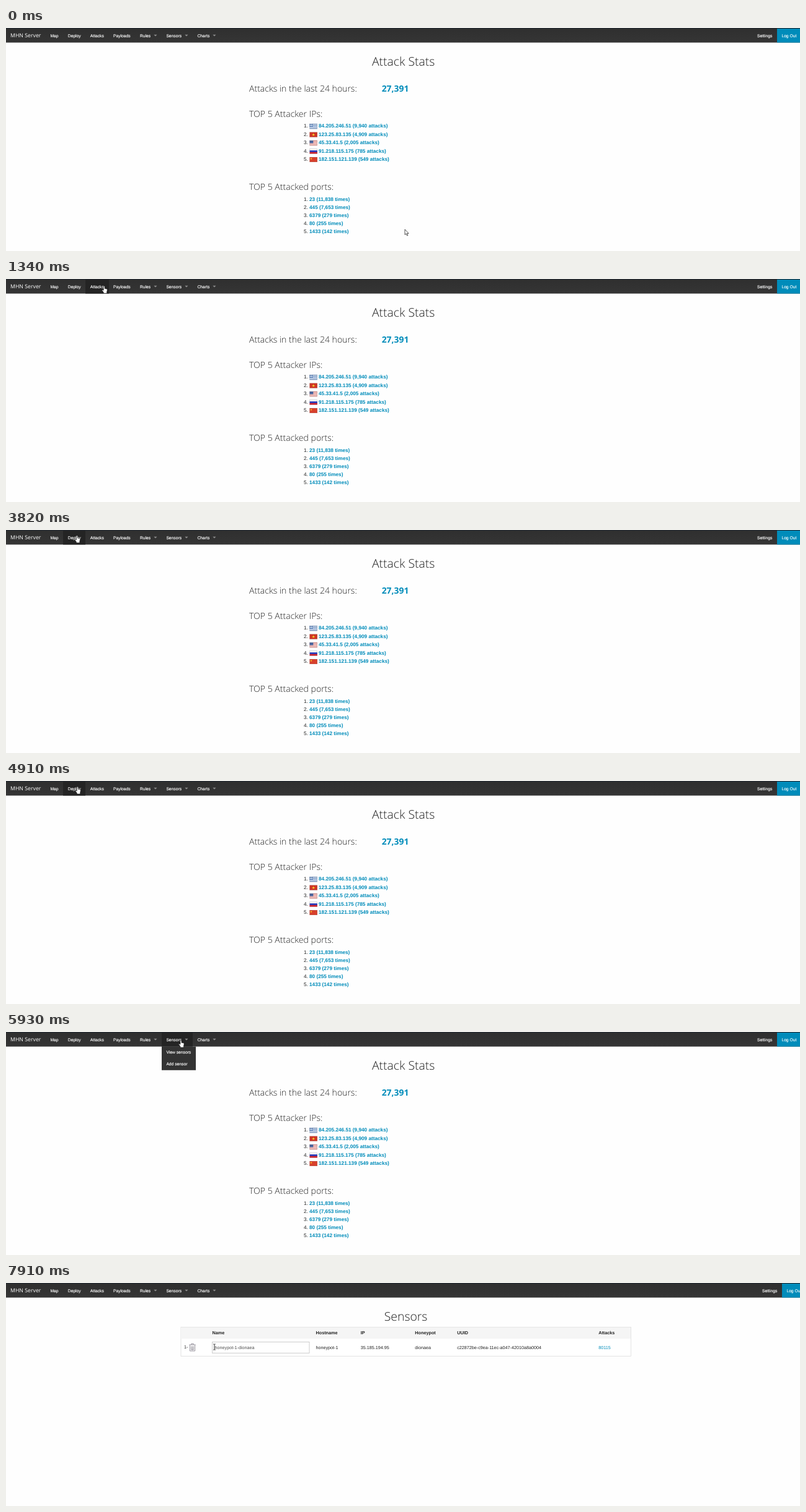
An HTML page that plays this animation: 1280x361 px, repeating every 8 s.

```html
<!DOCTYPE html>
<html lang="en">
<head>
<meta charset="utf-8">
<title>Attack Stats</title>
<style>
  html, body { margin: 0; width: 100%; height: 100%; overflow: hidden; background: #fefefe; }
  svg { display: block; width: 100%; height: 100%; }
  text { font-family: "Liberation Sans", Arial, sans-serif; fill: #222; white-space: pre; text-rendering: geometricPrecision; }
  .nav { font-size: 6.72px; fill: #fff; stroke: #fff; stroke-width: .14px; }
  .brand { font: 8.75px "Open Sans", sans-serif; fill: #fff; }
  .title { font: 300 19.4px "Open Sans", sans-serif; text-anchor: middle; }
  .head { font: 300 14.05px "Open Sans", sans-serif; }
  .count { font: 700 13.9px "Open Sans", sans-serif; fill: #008cba; }
  .item { font-size: 8.2px; }
  .link { font-size: 8.22px; font-weight: 700; fill: #008cba; }
  .cell { font-size: 7.2px; }
  .th { font-size: 7.25px; font-weight: 700; }
</style>
</head>
<body>
<svg id="stage" viewBox="0 0 1280 361" preserveAspectRatio="none">
  <defs>
    <linearGradient id="barFill" x2="0" y2="1">
      <stop offset="0" stop-color="#2f2f2f"/><stop offset="1" stop-color="#353535"/>
    </linearGradient>
  </defs>
  <g id="stats"></g>
  <g id="sensors"></g>
  <rect width="1280" height="23.6" fill="url(#barFill)"/>
  <rect id="hover" height="23.6" fill="#242424"/>
  <g id="nav"></g>
  <g id="account"></g>
  <rect width="1280" height="1" fill="#1d232b"/>
  <g id="menu"></g>
  <g id="cursor">
    <path id="arrow" d="M0 0V8.6L2 6.9L3.5 10.2L4.9 9.6L3.5 6.5H6.1Z" fill="#fff" stroke="#111" stroke-width=".7" stroke-linejoin="round"/>
    <path id="hand" d="M-1 .8Q0-.5 1 .8V4.2L4 4.8Q5.2 5.1 5.1 6.6L4.4 9.6V12H-1V10.4L-3.4 7.1Q-3.4 5.7-2.2 6.2L-1 7.2Z" fill="#fff" stroke="#111" stroke-width=".6" stroke-linejoin="round"/>
    <path id="beam" d="M-1.8-4.6H-.4L0-4.2L.4-4.6H1.8M0-4.2V4.2M-1.8 4.6H-.4L0 4.2L.4 4.6H1.8" fill="none" stroke="#222" stroke-width=".9"/>
  </g>
</svg>
<script>
const LOOP = 8000, STEP = 67.5, PAGE_TIME = 7005, MENU_TIME = 5700;
const $ = id => document.getElementById(id);

function add(parent, tag, attrs, content = "") {
  const el = document.createElementNS("http://www.w3.org/2000/svg", tag);
  for (const key in attrs) el.setAttribute(key, attrs[key]);
  el.textContent = content;
  parent.appendChild(el);
  return el;
}
const label = (parent, x, y, cls, content) => add(parent, "text", { x, y, class: cls }, content);
const box = (parent, x, y, width, height, fill, extra = {}) =>
  add(parent, "rect", { x, y, width, height, fill, ...extra });
const shape = (parent, d, fill, extra = {}) => add(parent, "path", { d, fill, ...extra });

// Navigation: label, text x, left edge, right edge, caret x
const tabs = [
  ["Map", 71.5, 64, 92], ["Deploy", 99.8, 92, 128], ["Attacks", 135.8, 128, 166],
  ["Payloads", 173, 166, 208], ["Rules", 216, 208, 251, 238.3],
  ["Sensors", 258.4, 251, 301, 288.3], ["Charts", 308.5, 301, 346, 333.3]
];
label($("nav"), 7, 15.2, "brand", "MHN Server");
for (const [name, x, , , caret] of tabs) {
  label($("nav"), x, 14.5, "nav", name);
  if (caret) shape($("nav"), `M${caret} 10.7h5.2l-2.6 2.7z`, "#8c8c8c");
}
box($("account"), 1243, 0, 60, 23.6, "#008cba");
label($("account"), 1211, 14.5, "nav", "Settings");
label($("account"), 1250.4, 14.5, "nav", "Log Out");

box($("menu"), 251, 23.6, 55, 38.2, "#333");
label($("menu"), 258.4, 35.4, "nav", "View sensors");
label($("menu"), 258.4, 54.4, "nav", "Add sensor");

function star(g, x, y, r) {
  let d = "";
  for (let i = 0; i < 10; i++) {
    const a = i * Math.PI / 5 - Math.PI / 2, q = i % 2 ? r * .4 : r;
    d += (i ? "L" : "M") + (x + q * Math.cos(a)) + " " + (y + q * Math.sin(a));
  }
  shape(g, d + "Z", "#f6d52c");
}
const stripes = (g, y, colors) =>
  colors.forEach((c, i) => box(g, 489.5, y + i * 8 / colors.length, 12.4, 8 / colors.length, c));
const flags = [
  (g, y) => {
    stripes(g, y, [..."010101010"].map(c => c === "0" ? "#3e6cae" : "#eef2f8"));
    box(g, 489.5, y, 4.8, 4.5, "#3e6cae");
    shape(g, `M489.5 ${y + 2.2}h4.8M491.9 ${y}v4.5`, "none", { stroke: "#eef2f8", "stroke-width": .9 });
  },
  (g, y) => { box(g, 489.5, y, 12.4, 8, "#cf3524"); star(g, 495.7, y + 4.1, 2.6); },
  (g, y) => {
    stripes(g, y, [..."010101010"].map(c => c === "0" ? "#d65a54" : "#f6e9e8"));
    box(g, 489.5, y, 5.8, 4.4, "#48649f");
  },
  (g, y) => stripes(g, y, ["#f4f4f4", "#1c2fb5", "#cf2027"]),
  (g, y) => { box(g, 489.5, y, 12.4, 8, "#d8402c"); star(g, 492, y + 2.5, 1.7); }
];

const stats = $("stats");
label(stats, 640.6, 61, "title", "Attack Stats");
label(stats, 392, 103, "head", "Attacks in the last 24 hours:");
label(stats, 605.7, 103, "count", "27,391");
label(stats, 392, 143.5, "head", "TOP 5 Attacker IPs:");
label(stats, 392, 261.8, "head", "TOP 5 Attacked ports:");
["84.205.246.51 (9,940", "123.25.83.135 (4,909", "45.33.41.5 (2,005",
 "91.218.115.175 (785", "182.151.121.139 (549"].forEach((entry, i) => {
  const y = 161.4 + i * 13.45;
  label(stats, 480, y, "item", i + 1 + ".");
  flags[i](stats, y - 6.2);
  box(stats, 489.7, y - 6, 12, 7.6, "none", { stroke: "#777", "stroke-opacity": .45, "stroke-width": .5 });
  label(stats, 504, y, "link", entry + " attacks)");
});
["23 (11,838", "445 (7,653", "6379 (279", "80 (255", "1433 (142"].forEach((entry, i) => {
  const y = 280 + i * 13.08;
  label(stats, 480, y, "item", i + 1 + ".");
  label(stats, 489, y, "link", entry + " times)");
});

const sensors = $("sensors");
label(sensors, 644.6, 61, "title", "Sensors");
box(sensors, 282, 71.5, 725.5, 47, "#fff", { stroke: "#ddd", "stroke-width": .8 });
box(sensors, 282.4, 71.9, 724.7, 18.4, "#f5f5f5");
[[332.5, "Name"], [499.5, "Hostname", "honeypot-1"], [571.7, "IP", "35.185.194.95"],
 [659.3, "Honeypot", "dionaea"], [727.2, "UUID", "c22872be-c9ea-11ec-a047-42010a8a0004"],
 [955.2, "Attacks", "80115"]].forEach(([x, head, value]) => {
  label(sensors, x, 83.2, "th", head);
  if (value) label(sensors, x, 106.5, "cell", value);
});
sensors.lastChild.style.fill = "#008cba";
label(sensors, 287, 106.3, "cell", "1-");
box(sensors, 332.5, 95.5, 156.5, 18, "#fff", { stroke: "#c8c8c8", "stroke-width": .9 });
label(sensors, 336.6, 106.5, "cell", "honeypot-1-dionaea").style.fill = "#4d4d4d";
shape(sensors, "M295.3 100h10.4M298.7 99.8v-1.5h3.6v1.5M296.4 100.4v9.6h8.2v-9.6M298.6 102.3v5.8M300.5 102.3v5.8M302.4 102.3v5.8M298.5 108h4",
  "none", { stroke: "#8d8994", "stroke-width": .9 });

// Pointer tip: time, x, y
const path = [
  [0, 643, 326], [200, 477.5, 203], [405, 477.5, 203], [810, 300, 95], [1080, 165, 10],
  [1210, 156, 6], [1275, 156, 6], [1340, 159, 11], [1480, 148, 14], [1750, 70, 21], [2090, 29, 15],
  [2160, 36, 14], [2300, 56, 12.5], [2430, 66, 28], [2560, 44, 44], [2710, 30, 12],
  [2850, 30, 12], [3110, 19, 16], [3400, 31, 11], [3480, 31, 11],
  [3820, 125.5, 8.5], [4030, 152, 9], [4370, 152, 9], [4910, 111.5, 9], [5180, 150, 10],
  [5250, 160, 32], [5520, 205, 112], [5730, 268, 28], [5930, 282, 13],
  [6140, 282, 13], [6400, 282, 22.5], [6610, 282, 22.5], [6670, 283, 22.5],
  [6750, 283, 22.5], [6810, 282, 28], [6950, 282, 28], [7400, 312, 80],
  [7770, 328.5, 101], [7840, 334, 103], [7910, 336.3, 103.7], [8000, 336.3, 103.7]
];

function pointerAt(t) {
  const i = Math.max(1, path.findIndex(p => p[0] >= t));
  const [t0, x0, y0] = path[i - 1], [t1, x1, y1] = path[i];
  const k = (t - t0) / (t1 - t0);
  return [x0 + (x1 - x0) * k, y0 + (y1 - y0) * k];
}
const show = (el, on) => el.setAttribute("visibility", on ? "visible" : "hidden");

function draw(now) {
  const t = now % LOOP;
  const held = Math.min(Math.floor((t + 10) / STEP) * STEP, LOOP);
  const [x, y] = pointerAt(held);
  const second = t >= PAGE_TIME;
  const open = !second && t >= MENU_TIME && x >= 251 && x < 306 && y < 62;
  const tab = open ? tabs[5] : y < 23.6 && tabs.find(item => x >= item[2] && x < item[3]);

  show($("stats"), !second);
  show($("sensors"), second);
  show($("menu"), open);
  show($("hover"), !!tab);
  if (tab) {
    $("hover").setAttribute("x", tab[2]);
    $("hover").setAttribute("width", tab[3] - tab[2]);
  }
  $("account").setAttribute("transform", `translate(${second ? 8 : 0})`);

  const typing = second && x > 332 && y > 95;
  const pointing = !typing && (open || !!tab || (x < 64 && y < 23.6));
  show($("beam"), typing);
  show($("hand"), pointing);
  show($("arrow"), !typing && !pointing);
  $("cursor").setAttribute("transform", `translate(${x} ${y})`);
}

const start = performance.now();
function tick() {
  draw(performance.now() - start);
  requestAnimationFrame(tick);
}
tick();
</script>
</body>
</html>
```
